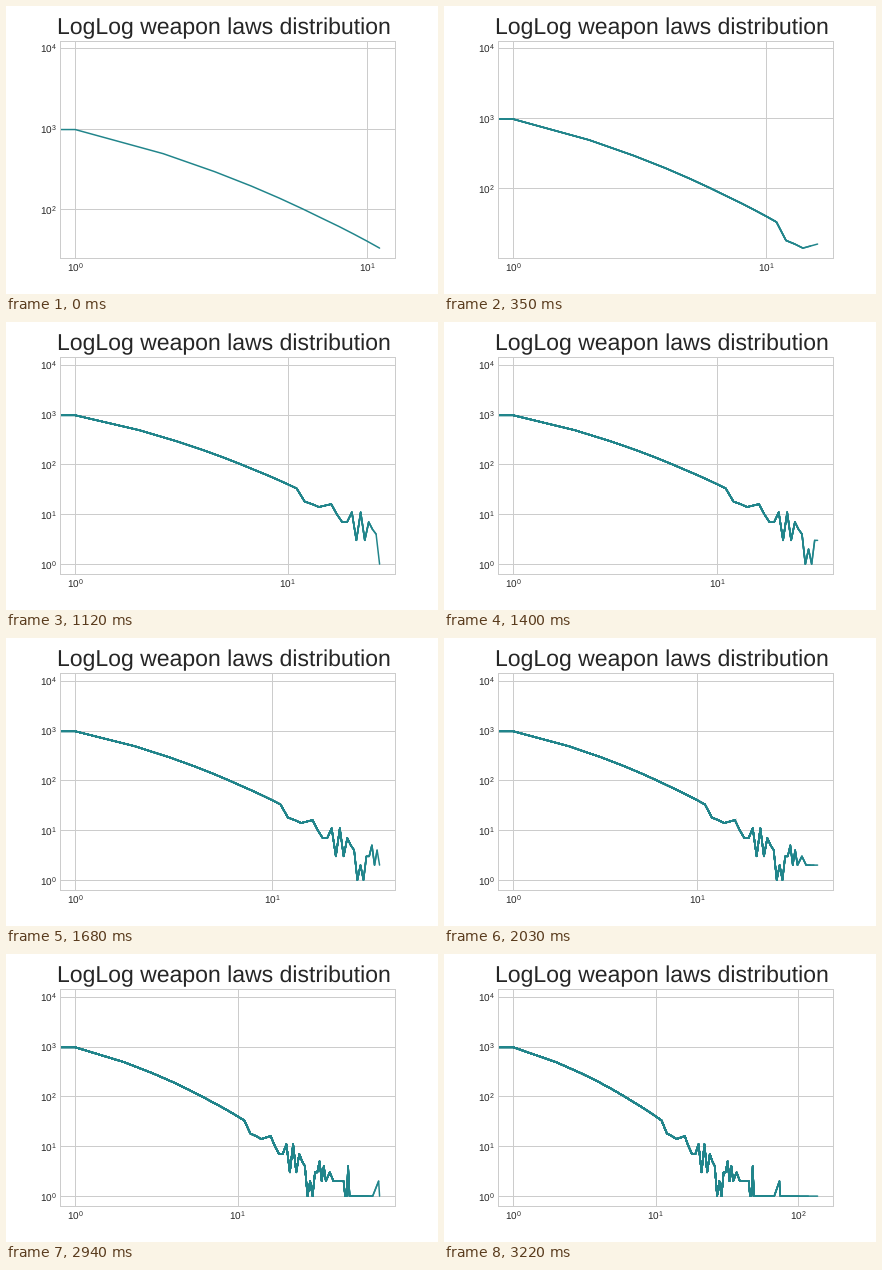
A matplotlib script for the animation above (3.99 s loop, 432x288 px).

```python
import numpy as np
import matplotlib.pyplot as plt
from matplotlib.animation import FuncAnimation

plt.rcParams.update({
    "font.family": "sans-serif",
    "font.sans-serif": ["Liberation Sans"],
    "font.size": 10,
    "text.color": ".15",
    "text.hinting": "none",
    "axes.edgecolor": ".8",
    "axes.linewidth": 1,
    "axes.axisbelow": True,
    "grid.color": ".8",
    "grid.linewidth": 1,
    "lines.solid_capstyle": "round",
})

START = 12    # points drawn in the first frame, x = 0 included
STEPS = 47
HOLD = 10
STEP_MS = 70
Y_MAX = 9270  # count at x = 0, off the log axis but part of the y range

# Rough course of the noisy tail, joined by straight log-log segments.
TAIL = [(11, 33), (12, 18), (14, 14), (16, 16), (18, 7), (20, 7.4), (22, 5.2),
        (25, 4.6), (28, 1.2), (32, 4.1), (34, 2.65), (37, 2.6), (39, 2),
        (45, 2), (47, 1), (48, 4), (49, 1), (68, 1), (74, 2), (75, 1)]


def power_law(x):
    u = np.log10(x)
    return 10 ** (2.987 - 0.823 * u - 0.565 * u ** 2)


def tail(x):
    kx, ky = np.log(TAIL).T
    trend = np.exp(np.interp(np.log(x), kx, ky))
    # Even values swing up, odd ones down, in fading beats.
    fade = np.where(x < 20, 0, np.clip((42 - x) / 20, 0, None))
    beat = np.abs(np.cos(np.pi * (x - 22) / 6))
    return trend * 2.1 ** (fade * beat * np.cos(np.pi * x))


def padded(lo, hi, margin=0.05):
    a, b = np.log10([lo, hi])
    pad = margin * (b - a)
    return 10 ** (a - pad), 10 ** (b + pad)


# Values get sparser towards the right.
xs = np.r_[1:36, 37:47:2, 46:52, 52:69:4, 74,
           np.geomspace(75, 137, 5).round()]
ys = np.maximum(1, np.round(np.where(xs <= 11, power_law(xs), tail(xs))))

fig = plt.figure(figsize=(6, 4), dpi=72, facecolor="white")
ax = fig.add_axes([0.125, 0.125, 0.775, 0.755])
ax.set_xscale("log")
ax.set_yscale("log")
ax.grid(True, which="major")
ax.tick_params(which="both", length=0, labelcolor=".15")
ax.tick_params(which="major", pad=3.5)
fig.text(217.6 / 432, 1 - 28.6 / 288, "LogLog weapon laws distribution",
         size=23, ha="center", va="baseline")

# Each step adds one longer curve on top of the earlier ones.
lines = []
for k in range(STEPS):
    n = START - 1 + k
    line, = ax.plot(np.r_[0.1, xs[:n]], np.r_[ys[0], ys[:n]],
                    color="#21858b", lw=1.5)
    lines.append(line)


def update(frame):
    step = min(frame, STEPS - 1)
    n = START - 1 + step
    for k, line in enumerate(lines):
        line.set_visible(k <= step)
    ax.set_xlim(*padded(1, xs[n - 1]))
    ax.set_ylim(*padded(ys[:n].min(), Y_MAX))
    return lines


anim = FuncAnimation(fig, update, frames=STEPS + HOLD, interval=STEP_MS,
                     repeat=True, repeat_delay=0, blit=False)
plt.show()
```
